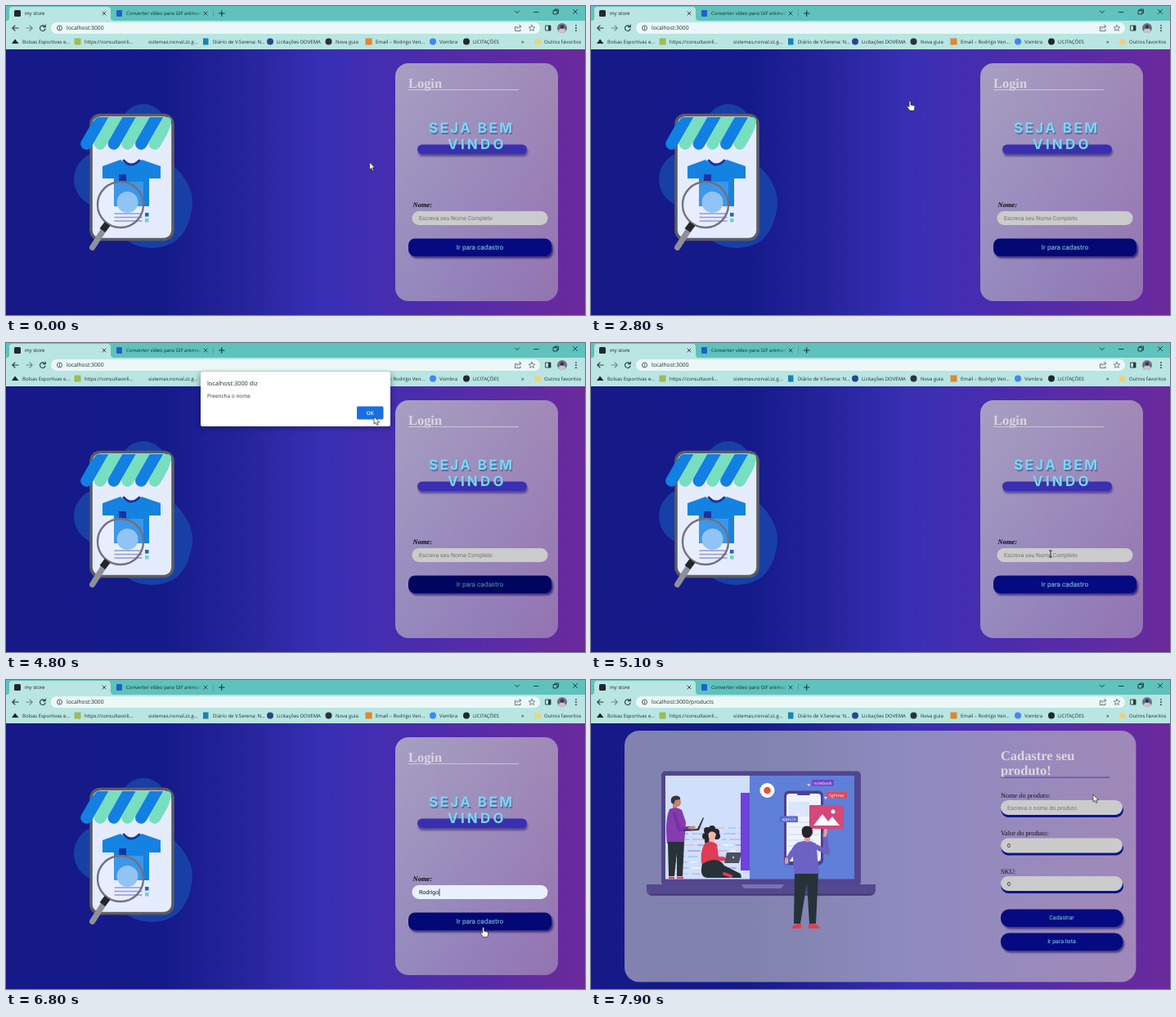
These frames come from a looping animation (708x378 px, 8 s). An HTML page:

```html
<!DOCTYPE html>
<html lang="pt-BR">
<head>
<meta charset="utf-8">
<title>my store</title>
<style>
html, body { margin: 0; width: 100%; height: 100%; overflow: hidden; background: #161a88; }
svg { display: block; width: 708px; height: 378px; text-rendering: geometricPrecision; }
text { white-space: pre; }
.ui { font-family: "Open Sans", "Noto Sans", sans-serif; }
.form { font-family: Roboto, Arial, sans-serif; }
.serif { font-family: "Liberation Serif", "Times New Roman", serif; }
.big { font-family: Inter, sans-serif; font-weight: 700; }
</style>
</head>
<body>
<svg id="stage" viewBox="0 0 708 378" xmlns="http://www.w3.org/2000/svg"></svg>
<script>
const LOOP = 8000, STEP = 100;
const ALERT_OPEN = 3000, ALERT_OK = 4800, ALERT_GONE = 4900, FOCUS = 5300, FILL = 5400, NEXT_PAGE = 6900;
const stage = document.getElementById('stage');

const rect = (x, y, w, h, fill, r = 0, more = '') =>
  `<rect x="${x}" y="${y}" width="${w}" height="${h}" rx="${r}" fill="${fill}" ${more}/>`;
const disc = (x, y, r, fill, more = '') => `<circle cx="${x}" cy="${y}" r="${r}" fill="${fill}" ${more}/>`;
const path = (d, fill, more = '') => `<path d="${d}" fill="${fill}" ${more}/>`;
const line = (d, color, w = 1, more = '') =>
  `<path d="${d}" fill="none" stroke="${color}" stroke-width="${w}" stroke-linecap="round" stroke-linejoin="round" ${more}/>`;
const text = (x, y, size, str, fill, cls = 'ui', more = '') =>
  `<text x="${x}" y="${y}" font-size="${size}" fill="${fill}" class="${cls}" ${more}>${str}</text>`;
const grad = (id, dir, stops) => `<linearGradient id="${id}" ${dir}>` +
  stops.map(([o, c, a = 1]) => `<stop offset="${o}" stop-color="${c}" stop-opacity="${a}"/>`).join('') + '</linearGradient>';

function seeded(seed) {
  return () => (seed = (seed * 16807) % 2147483647) / 2147483647;
}

const defs = '<defs>' +
  grad('page', 'x1="0" x2="1"', [[0, '#171988'], [.27, '#141a8a'], [.4, '#252399'], [.55, '#382fb4'], [.7, '#4a2cae'], [1, '#6b2a9c']]) +
  grad('glass', 'x1="0" y1="0" x2="1" y2="1"', [[0, '#c8c8c8', .74], [1, '#c8c8c8', .46]]) +
  grad('fade', '', [[0, '#5fc2bc', 0], [1, '#5fc2bc']]) +
  `<filter id="soft" x="-10%" y="-20%" width="120%" height="150%"><feGaussianBlur stdDeviation="1.3"/></filter>
  <filter id="wide" x="-10%" y="-20%" width="120%" height="150%"><feGaussianBlur stdDeviation="3"/></filter>
  <clipPath id="screen"><rect x="91" y="117" width="103" height="126"/></clipPath>
  <clipPath id="awning"><path d="M114 136H198Q203 137 202 143L190 180H84V166L108 140Q110 136 114 136Z"/></clipPath>
  </defs>`;

function browser() {
  const ink = '#2b3a3c';
  const marks = [
    [20, 'Bolsas Esportivas e...'], [96, 'https://consultaonli...'], [174, 'sistemas.norval.zz.g...'],
    [253, 'Diário de V.Serena: N...'], [331, 'Licitações DOVEMA'], [403, 'Nova guia'],
    [452, 'Email – Rodrigo Ven...'], [530, 'Vombra'], [571, 'LICITAÇÕES'], [658, 'Outros favoritos']
  ];
  return rect(0, 0, 708, 18, '#5fc2bc') +
    rect(0, 18, 708, 35, '#b9e5e2') +
    path('M1 18Q4 18 4 14V5Q4 1 8 1H124Q128 1 128 5V14Q128 18 132 18Z', '#b9e5e2') +
    rect(10, 5, 8, 8, '#20292f', 1.5) + text(23, 11.2, 6, 'my store', '#172326') +
    rect(135, 5, 7, 8, '#1d62c9', 1) + text(147, 11.2, 6, 'Converter vídeo para GIF animad', '#12302f') +
    rect(229, 2, 11, 13, 'url(#fade)') + rect(240, 2, 2, 13, '#5fc2bc') +
    line('M118 7l4 4m0-4l-4 4M242 7l4 4m0-4l-4 4', ink, .9) +
    line('M253.500 5V13', '#4a9994', .7) + line('M260.500 9H267M263.750 5.700V12.300', '#163133', 1.1) +
    line('M622.500 6l2.500 2.500l2.500-2.500M645.500 7.500H651M669.500 5.500H674V10H669.500ZM671 5.500V4H675.500V8.500H674M693.500 4.500l5 5m0-5l-5 5', '#163133', .9) +
    line('M15 27H8M11 23.800L7.800 27L11 30.200', ink, 1.1) +
    line('M25 27H32M29 23.800L32.200 27L29 30.200', '#68898a', 1.1) +
    line('M47.300 25A3.300 3.300 0 1 0 48 28M48.300 23V25.600H45.600', ink, 1.1) +
    rect(55, 20, 598, 14, '#ebf8f7', 7) +
    disc(65.5, 27, 3, 'none', `stroke="${ink}" stroke-width=".8"`) + line('M65.500 26.800V28.600M65.500 25.300V25.400', ink, .8) +
    line('M624.500 25.500H622.500V30.500H629V28.500M624.800 28Q625 25 629.500 25M627.700 23l2 2l-2 2', '#47595b', .8) +
    line('M643 23.300l1.100 2.500l2.700.2l-2.100 1.700l.7 2.700l-2.400-1.500l-2.400 1.500l.7-2.700l-2.100-1.700l2.700-.2Z', '#47595b', .7) +
    line('M660 24H666V30H660Z', ink, .9) + rect(663, 24, 3, 6, ink) +
    disc(680, 27, 6, '#6d6f8d') + path('M675.500 31Q676 27.500 680 27.500T684.500 31A6 6 0 0 1 675.500 31', '#d0c4c6') + disc(680, 25.5, 2.3, '#3e3444') +
    disc(697, 23.8, .9, ink) + disc(697, 27, .9, ink) + disc(697, 30.2, .9, ink) +
    path('M7 46L11 40.500L15.500 46Z', '#182024') + rect(83.500, 39.500, 8, 8, '#9dbb52', 1) +
    rect(241, 39.500, 6.500, 8, '#1683b8') + disc(323, 43.5, 4, '#27478c') + disc(394.5, 43.5, 4, '#27343a') +
    rect(439.500, 39.500, 8, 8, '#e0872d') + disc(522, 43.5, 4, '#4285f4') + disc(563, 43.5, 4, '#20282c') +
    text(630, 46, 7, '»', '#172326') + path('M646.500 40H649.500L650.500 41H654V47H646.500Z', '#eed27a') +
    marks.map(([x, s]) => text(x, 45.700, 6, s, '#1d3032')).join('');
}

function shop() {
  let awning = '';
  for (let i = 0; i < 6; i++) {
    const x = 98.5 + 16.7 * i;
    awning += line(`M${x} 168.500L${x + 21} 132`, i % 2 ? '#77dfbf' : '#1180e2', 14.5);
  }
  return disc(168, 148, 28, '#183fa6') + disc(117, 212, 34, '#183fa6') +
    path('M150 180Q195 180 214 205Q232 228 227 250Q219 296 178 296Q142 295 130 262Z', '#183fa6') +
    rect(104, 133.500, 100, 152, '#e5ecfd', 11, 'stroke="#5c5d63" stroke-width="3.6"') +
    `<g clip-path="url(#awning)">${awning}</g>` +
    path('M118 196L140 188Q153 201 166 188L189 196V211H175V245H132V211H118Z', '#1482e0') +
    line('M144 189Q153 199 163 189', '#1733a4', 3) + rect(138, 206, 9, 9, '#1733a4') +
    disc(140, 243, 28, '#e8effd', 'fill-opacity=".45"') +
    rect(132, 215, 36, 30, '#3d96e8') + disc(148.5, 240, 13, '#91c3f4') +
    [254, 258.5, 263].map(y => line(`M133 ${y}H166`, '#9298dc', 1.5)).join('') +
    rect(170, 253, 4.500, 4.500, '#1a66c8') + rect(170, 260, 4.500, 4.500, '#6cd8b4') +
    disc(140, 243, 28, 'none', 'stroke="#73717a" stroke-width="2.4"') +
    line('M105.500 295.500L118 276', '#8d8f99', 7) +
    line('M118 274.500L124 266.500', '#25262d', 8.5, 'style="stroke-linecap:butt"');
}

function loginPage() {
  return shop() + rect(476, 70, 199, 291, 'url(#glass)', 16) +
    text(492, 100, 16.4, 'Login', '#d8d6dc', 'serif', 'font-weight="700"') + rect(492, 102, 135, .9, '#d0cdd9') +
    rect(504, 173, 134, 11, '#2b2077', 5.5, 'opacity=".6" filter="url(#soft)"') +
    rect(503, 169.500, 134, 11.500, '#3a2eb2', 5.7) +
    [['#31467c', 1.2, 1.5, .5], ['#75d8f8', 0, 0, 1]].map(([c, dx, dy, a]) => `<g opacity="${a}">` +
      text(517 + dx, 155 + dy, 17, 'SEJA BEM', c, 'big', 'letter-spacing="2.4"') +
      text(540 + dx, 175 + dy, 17, 'VINDO', c, 'big', 'letter-spacing="3.2"') + '</g>').join('') +
    text(497.500, 245.500, 8.500, 'Nome:', '#0b0910', 'serif', 'font-weight="700" font-style="italic"') +
    rect(496.500, 251, 166, 17, '#cbcbcb', 8.5, 'id="field"') +
    text(505, 262.300, 7, 'Escreva seu Nome Completo', '#737378', 'form', 'id="entry"') +
    rect(0, 255.500, .8, 8.500, '#111', 0, 'id="caret"') +
    rect(494, 287.500, 175, 21, '#171063', 8, 'opacity=".75" filter="url(#soft)"') +
    rect(492, 284.500, 175, 21.500, '#060a80', 8, 'id="go"') +
    text(579.500, 298.200, 8.200, 'Ir para cadastro', '#86dde6', 'form', 'id="goText" text-anchor="middle"');
}

function laptop() {
  const rnd = seeded(41), tones = ['#dcaed0', '#a99be0', '#f5f8ff', '#9dc3ee', '#ecb9c6'];
  const slate = '#263238', skin = '#e2a08f';
  let code = '';
  for (let y = 181; y < 240; y += 7) {
    for (let x = 93 + rnd() * 8; x < 182;) {
      const w = 4 + rnd() * 13;
      code += line(`M${x.toFixed(1)} ${y}h${w.toFixed(1)}`, tones[Math.floor(rnd() * 5)], 1.6);
      x += w + 5;
    }
  }
  const tag = (x, y, w, c, s) => rect(x, y, w, 7.5, c, 1) + text(x + w / 2, y + 5.600, 5, s, '#fff', 'ui', 'text-anchor="middle"');
  const stander = path('M100 145H109L110 150Q109 155 105 155L105 159H100Z', '#c98170') +
    path('M98 150Q96 142 104 141.500Q110 142 109 146L103 147L101 152Z', '#37333c') +
    path('M96 158Q104 154 111 159L116 174L114 200H93Q90 172 96 158Z', '#843caf') +
    path('M94 198H114L112 240H105L105 212L102 240H95Z', slate) +
    line('M102 164L108 183L120 181', '#7533a0', 4.5) + line('M120 181L126 180', '#c98170', 3) +
    path('M113 183L130 182L137 168L138 169L132 184L113 185Z', '#343644') + line('M96 242H101M106 242H112', '#d9445a', 2.5);
  const sitter = [[142, 184], [148, 182], [153, 186], [140, 191], [143, 197], [154, 191]].map(([x, y]) => disc(x, y, 4, '#26242c')).join('') +
    path('M145 186Q151 184 153 189L151 195Q149 197 148 201H144Z', '#f0b7a6') +
    path('M139 200Q147 195 154 201L157 224L136 227Q132 212 139 200Z', '#dc3d55') + line('M141 205L147 218L162 219', '#dc3d55', 5) +
    path('M136 225Q155 214 163 227L183 237L184 242H142Q132 241 136 225Z', slate) + line('M163 237L171 240', '#dc3d55', 4) +
    path('M163 224L166 211H184L181 224H163Z', '#4b505d') + disc(174, 217, 1.2, '#c6cad8');
  const phone = rect(236, 135.500, 48, 91, '#4a4094', 6) + rect(239, 139, 42, 83, '#f0f3ff', 4) + rect(252, 137, 16, 4, '#4a4094', 2) +
    rect(242, 149, 25, 18, '#dbe5fb') + line('M242 174H278M242 180H275M242 189H278M242 196H272M242 203H278', '#dbe4f8', 2) + rect(242, 209, 36, 8, '#c3d2f6', 2) +
    rect(267, 153, 42, 29, '#d5497a', 1) + path('M272 178L283 164L290 173L295 167L304 178Z', '#fff') + disc(296, 161, 2.5, '#fff');
  const man = path('M249 236H278L275 298H267L264 248L256 298H248Z', slate) +
    path('M252 199Q265 194 275 200L279 237H249L247 219Q246 205 252 199Z', '#6c62c4') +
    line('M275 204L289 211L286 191', '#6c62c4', 6) + line('M286 190L287 184', skin, 4) +
    line('M251 204L241 219L239 224', '#6c62c4', 6) + line('M239 223L239 219', skin, 4) +
    rect(261, 189, 7, 9, skin, 3) + path('M258 188Q256 179 264 178.500Q272 179 271 187Q269 193 264 193Q259 193 258 188Z', '#26242c') +
    path('M246 304Q247 299 252 298H257V304ZM266 298H273Q279 300 280 304H266Z', '#dd4051');
  return rect(86, 111.500, 244, 140, '#514690', 5) + rect(91, 117, 231, 126.500, '#5f7fd8') + rect(91, 117, 103, 126.500, '#d0e0fb') +
    `<g clip-path="url(#screen)">${code}</g>` + rect(183, 138, 11, 95, '#7042dc') +
    path('M68 250H348V258Q347 264 339 264H77Q69 264 68 258Z', '#54498f') + path('M184 250H236L233 255H187Z', '#7c71b2') + line('M72 262.500H344', '#433977', 1.5) +
    stander + sitter + disc(215.5, 135, 9, '#fff') + disc(215.5, 135, 4.3, '#ed5035') + phone +
    tag(270, 122, 27, '#7443ca', 'notebook') + tag(288, 137, 25, '#df4859', 'lightnes') + tag(231, 166.500, 22, '#5869d0', 'apps.in') +
    path('M267 130l-3-3l4 .5ZM287 146l-2-3l4 0ZM250 164l6-2l-2 5Z', '#f5eaff') + man;
}

function productPage() {
  const field = (y, label, value, color) =>
    text(501, y - 3.300, 8.300, label, '#17121f', 'serif') +
    rect(501.500, y + 3, 149.500, 18, '#0b148e', 9) + rect(501, y, 149, 18, '#cbcbcb', 9) +
    text(509, y + 11.500, 7, value, color, 'form');
  const button = (y, label) => rect(503, y + 3, 149, 21, '#25206c', 10, 'opacity=".8" filter="url(#soft)"') +
    rect(501, y, 149.500, 21.500, '#060a80', 10) + text(575.500, y + 12.300, 7, label, '#7fdde4', 'form', 'text-anchor="middle"');
  return rect(41, 62, 625.500, 307.500, '#c8c8c8', 18, 'fill-opacity=".6"') + laptop() +
    text(501, 97.500, 16.400, 'Cadastre seu', '#dad8dd', 'serif', 'font-weight="700"') +
    text(501, 115.500, 16.400, 'produto!', '#dad8dd', 'serif', 'font-weight="700"') + rect(501, 118.700, 133, .9, '#3a359f') +
    field(147, 'Nome do produto:', 'Escreva o nome do produto', '#757579') +
    field(193.500, 'Valor do produto:', '0', '#15151b') + field(240, 'SKU:', '0', '#15151b') +
    button(280.500, 'Cadastrar') + button(309.500, 'Ir para lista');
}

const dialog = rect(237, 37, 234, 67, '#0b1230', 3, 'opacity=".4" filter="url(#wide)"') +
  rect(238, 35, 232, 67, '#fff', 2.5) + text(246, 51.500, 7.400, 'localhost:3000 diz', '#25272b') +
  text(246, 66.600, 6.450, 'Preencha o nome', '#33353a') +
  rect(428, 76.500, 34.500, 18, '#fff', 2.5, 'id="ring" stroke="#174ea6" stroke-width="1.2"') +
  rect(429, 77.500, 32.500, 16, '#1a6fe0', 1.8) + text(445.200, 87.900, 6.200, 'OK', '#fff', 'ui', 'font-weight="600" text-anchor="middle"');

const pointers = {
  arrow: path('M0 0V9.200L2.100 7.300L3.600 10.600L5.100 9.900L3.700 6.800H6.600Z', '#fff', 'stroke="#1a1a22" stroke-width=".7"'),
  hand: path('M-1 1Q0-.8 1 1V5L5 5.800Q6 6 6 7.500L5.200 12H-.2L-3.500 7.500Q-3.400 6-2 6.600L-1 7.500Z', '#fff', 'stroke="#1a1a22" stroke-width=".7"'),
  beam: line('M-1.500-4H1.500M0-4V4M-1.500 4H1.500', '#15151c', .8)
};

stage.innerHTML = defs + rect(0, 53, 708, 325, 'url(#page)') +
  `<g id="login">${loginPage()}</g><g id="products">${productPage()}</g>` + browser() +
  text(74, 29.400, 6.750, '', '#1c2a2c', 'ui', 'id="url"') + `<g id="dialog">${dialog}</g><g id="pointer">` +
  Object.keys(pointers).map(k => `<g id="${k}">${pointers[k]}</g>`).join('') + '</g>';

const $ = id => document.getElementById(id);
const show = (id, on) => $(id).setAttribute('display', on ? 'inline' : 'none');
const set = (id, name, value) => $(id).setAttribute(name, value);

// Pointer stops: time, x, y
const route = [
  [0, 444.5, 191], [800, 470, 215], [1300, 470, 215], [1800, 492.5, 234],
  [2300, 590, 291], [2800, 390, 116], [2900, 390, 116],
  [3200, 353, 120], [3900, 345, 140], [4700, 449, 89], [4800, 450, 90],
  [5100, 562, 258], [5300, 562, 258], [5800, 572, 141], [5900, 572, 141],
  [6600, 583, 298], [6900, 584, 304], [7700, 604, 70], [7900, 614, 140]
];

function pointAt(t) {
  const i = route.findIndex(p => p[0] > t);
  if (i < 0) return route[route.length - 1].slice(1);
  const [t0, x0, y0] = route[i - 1], [t1, x1, y1] = route[i];
  const k = (t - t0) / (t1 - t0), e = k * k * (3 - 2 * k);
  return [x0 + (x1 - x0) * e, y0 + (y1 - y0) * e];
}

const inside = (x, y, l, t, r, b) => x >= l && x <= r && y >= t && y <= b;

function pointerKind(t, x, y, products) {
  // The page hangs after the click, so the hand stays until the dialog is reached
  if (t >= 2300 && t < ALERT_GONE) return t < 4300 ? 'hand' : 'arrow';
  if (products) {
    if (inside(x, y, 501, 281, 650, 302) || inside(x, y, 501, 309, 650, 331)) return 'hand';
    return [147, 193, 240].some(top => inside(x, y, 501, top, 650, top + 18)) ? 'beam' : 'arrow';
  }
  if (inside(x, y, 492, 284, 667, 306)) return 'hand';
  return inside(x, y, 496, 251, 662, 268) ? 'beam' : 'arrow';
}

function draw(ms) {
  const t = Math.floor(ms % LOOP / STEP) * STEP;
  const products = t >= NEXT_PAGE;
  const [x, y] = pointAt(t), kind = pointerKind(t, x, y, products);

  show('login', !products);
  show('products', products);
  show('dialog', t >= ALERT_OPEN && t < ALERT_GONE);
  show('ring', t < ALERT_OK);
  $('url').textContent = 'localhost:3000' + (products ? '/products' : '');

  const filled = t >= FILL;
  $('entry').textContent = filled ? 'Rodrigo' : 'Escreva seu Nome Completo';
  set('entry', 'fill', filled ? '#16161c' : '#737378');
  set('field', 'fill', filled ? '#e8f0fe' : '#cbcbcb');
  show('caret', t >= FOCUS);
  if (!products) set('caret', 'x', filled ? 505.3 + $('entry').getComputedTextLength() : 505);

  const pressed = t >= ALERT_OK && t < 5000;
  const hover = t >= 2300 && t < ALERT_OK || !products && t > FILL && kind === 'hand';
  set('go', 'fill', pressed ? '#02055f' : hover ? '#030874' : '#060a80');
  set('goText', 'fill', pressed ? '#519f9f' : '#86dde6');

  for (const k in pointers) show(k, k === kind);
  set('pointer', 'transform', `translate(${x.toFixed(1)} ${y.toFixed(1)})`);
}

function tick() {
  draw(performance.now());
  requestAnimationFrame(tick);
}
tick();
</script>
</body>
</html>
```
